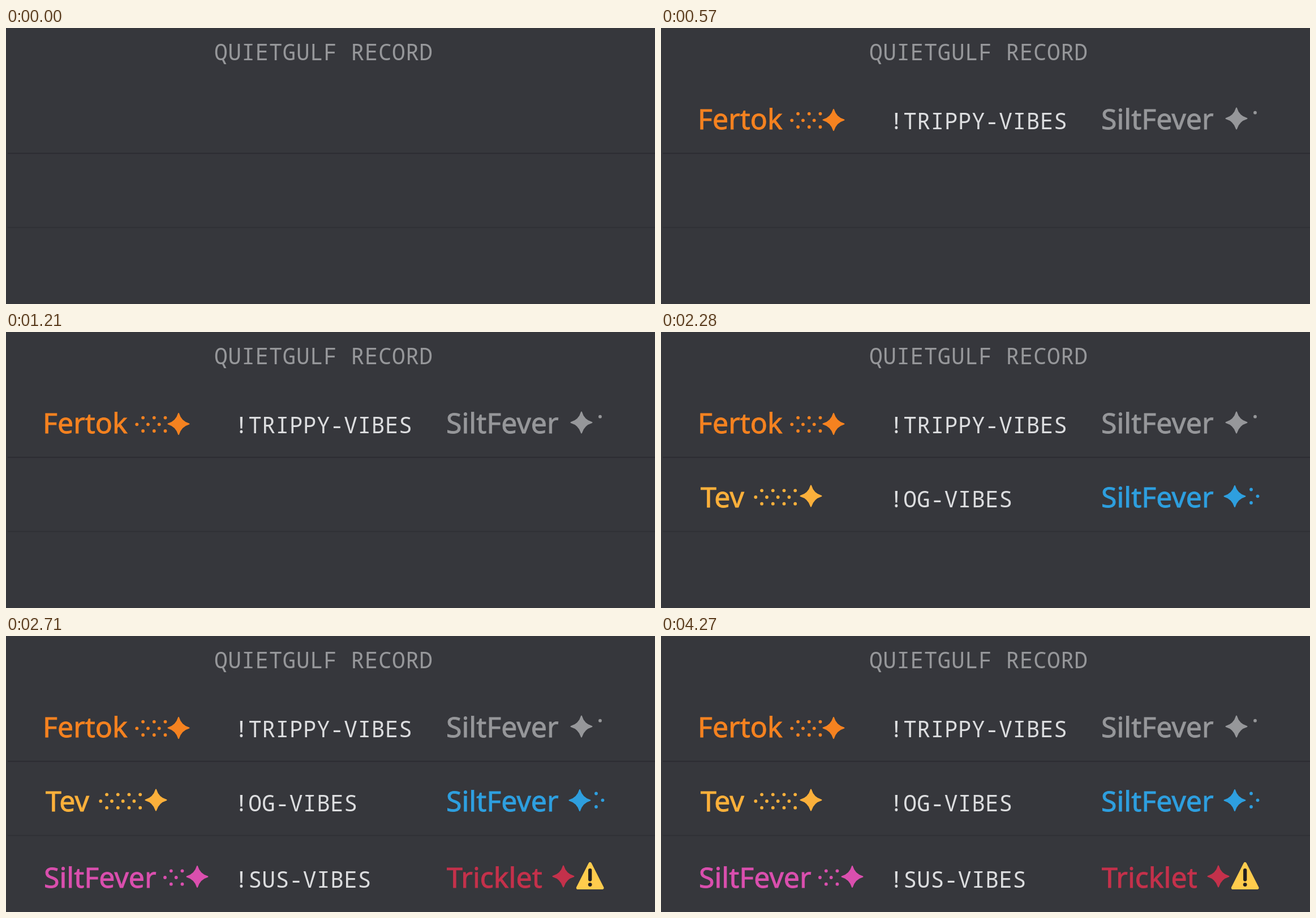
An HTML page that plays this animation: 1147x488 px, repeating every 5310 ms.

```html
<!DOCTYPE html>
<html lang="en">
<head>
<meta charset="utf-8">
<title>Ledger</title>
<style>
  html, body { margin: 0; width: 100%; height: 100%; overflow: hidden; background: #36373c; }
  svg { display: block; width: 100%; height: 100%; }
  .name { font: 400 50px "Noto Sans", "Open Sans", sans-serif; stroke-width: 0.9; }
  .code { font: 400 39.6px "Noto Sans Mono", monospace; letter-spacing: 0.41px; fill: #dcdddf; }
  .title { fill: #96979a; }
</style>
</head>
<body>
<svg id="stage" viewBox="0 0 1147 488">
  <path d="M3 221.7H1147" stroke="#2a2b30" stroke-width="1.8"/>
  <path d="M3 352.6H1147" stroke="#2f3035" stroke-width="1.8"/>
  <text class="code title" x="368" y="56.5">QUIETGULF RECORD</text>
</svg>
<script>
const LOOP = 5310;
const stage = document.getElementById('stage');

function add(parent, tag, attrs, text = '') {
  const node = document.createElementNS(stage.namespaceURI, tag);
  for (const key in attrs) node.setAttribute(key, attrs[key]);
  node.textContent = text;
  return parent.appendChild(node);
}

const dot = (g, x, y) => add(g, 'circle', { cx: x, cy: y, r: 2.9 });

function star(g, x, y, color) {
  add(g, 'path', {
    d: 'M0-18.5Q4.1-4.1 18.5 0Q4.1 4.1 0 18.5Q-4.1 4.1-18.5 0Q-4.1-4.1 0-18.5Z',
    transform: `translate(${x} ${y})`,
    stroke: color, 'stroke-width': 2, 'stroke-linejoin': 'round'
  });
}

// Each group is one middle dot followed by a vertical pair.
function trail(g, x, y, groups) {
  for (let i = 0; i < groups; i++) {
    const left = x + i * 19.7;
    dot(g, left, y);
    dot(g, left + 10.8, y - 11.7);
    dot(g, left + 10.8, y + 11.7);
  }
}

function warning(g, x, y) {
  const sign = add(g, 'g', { transform: `translate(${x} ${y}) scale(1.4)` });
  add(sign, 'path', {
    d: 'M18 2.7L33.4 33H2.6Z', fill: '#ffcc4d', stroke: '#ffcc4d',
    'stroke-width': 4, 'stroke-linejoin': 'round'
  });
  add(sign, 'path', {
    d: 'M18 10.8V22.5', stroke: '#231f20', 'stroke-width': 4.5, 'stroke-linecap': 'round'
  });
  add(sign, 'circle', { cx: 18, cy: 28.95, r: 2.42, fill: '#231f20' });
}

const rows = [
  {
    at: 570, base: 179, code: '!TRIPPY-VIBES',
    from: { name: 'Fertok', color: '#f58220', x: 65, star: [305, 162.5], trail: [231.3, 163.3, 3] },
    to: { name: 'SiltFever', color: '#96979a', x: 778, star: [1017, 160], dots: [[1050, 149.7]] }
  },
  {
    at: 1640, base: 309.5, code: '!OG-VIBES',
    from: { name: 'Tev', color: '#fbb03b', x: 70, star: [265, 290], trail: [167.3, 292, 4] },
    to: {
      name: 'SiltFever', color: '#2e9fdf', x: 778, star: [1014, 290.5],
      dots: [[1043, 278.5], [1043, 302], [1054.5, 290.3]]
    }
  },
  {
    at: 2710, base: 444.5, code: '!SUS-VIBES',
    from: { name: 'SiltFever', color: '#da4fae', x: 67, star: [338, 425.5], trail: [281, 427, 2] },
    to: { name: 'Tricklet', color: '#c4314b', x: 779, star: [985, 425], warning: [1007, 399] }
  }
];

function drawPlayer(row, base, player) {
  const g = add(row, 'g', { fill: player.color });
  add(g, 'text', { x: player.x, y: base, class: 'name', stroke: player.color }, player.name);
  star(g, ...player.star, player.color);
  if (player.trail) trail(g, ...player.trail);
  for (const [x, y] of player.dots || []) dot(g, x, y);
  if (player.warning) warning(g, ...player.warning);
}

for (const { at, base, code, from, to } of rows) {
  const row = add(stage, 'g', {});
  drawPlayer(row, base, from);
  add(row, 'text', { x: 404, y: base, class: 'code' }, code);
  drawPlayer(row, base, to);
  row.animate([
    { opacity: 0, offset: 0, easing: 'step-end' },
    { opacity: 1, offset: at / LOOP },
    { opacity: 1, offset: 1 }
  ], { duration: LOOP, iterations: Infinity });
}
</script>
</body>
</html>
```
